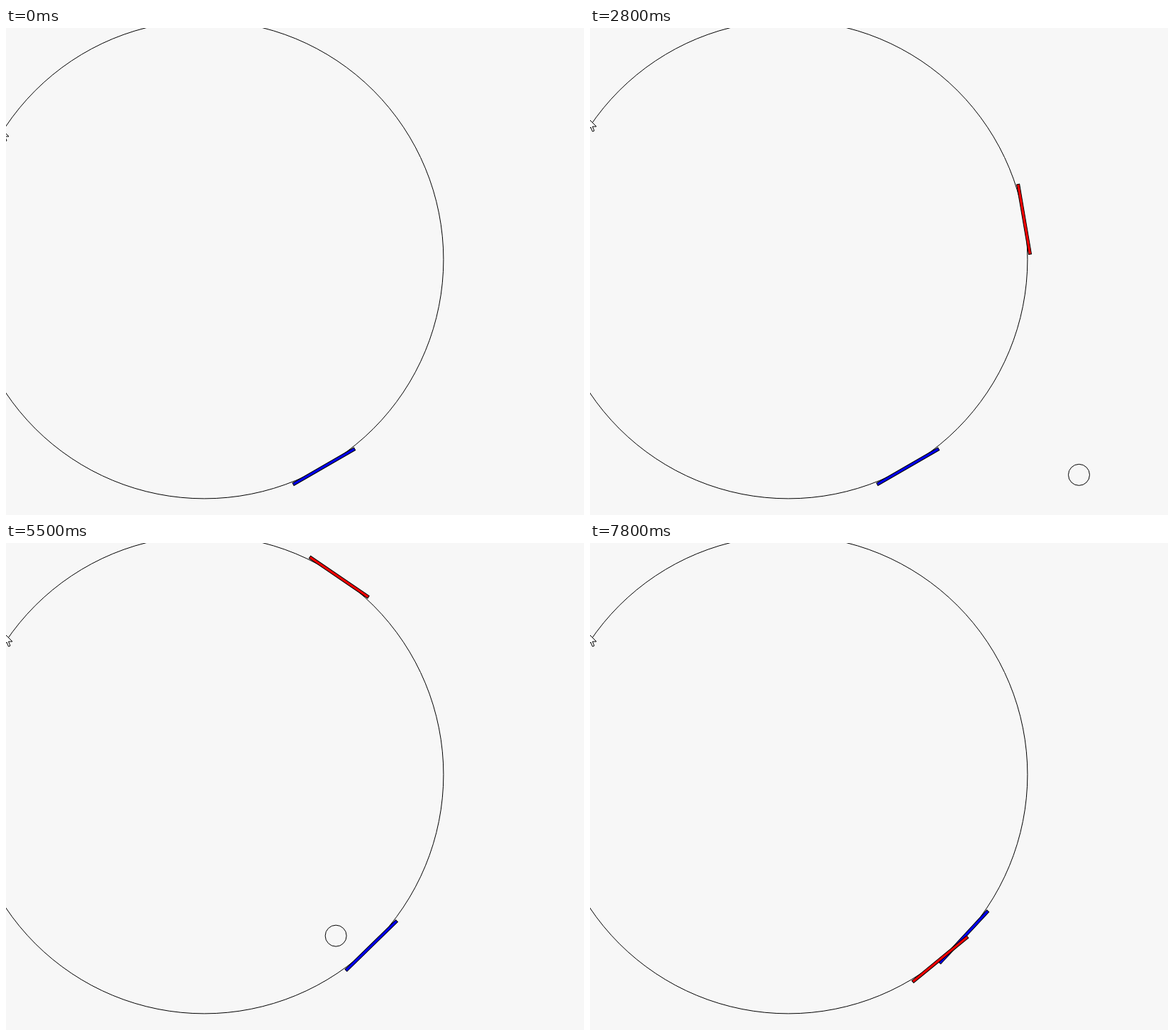
Write an HTML page with a canvas that moves like this. It is 815 px wide and 687 px high and loops after 8000 ms.

```html
<!DOCTYPE html>
<html lang="en">
<head>
<meta charset="utf-8">
<title>Circular paddle game</title>
<style>
  html, body { margin: 0; width: 100%; height: 100%; overflow: hidden; background: #f7f7f7; }
  canvas { display: block; }
</style>
</head>
<body>
<canvas id="stage" width="815" height="687"></canvas>
<script>
const ctx = document.getElementById('stage').getContext('2d');
const LOOP = 8000, STEP = 100;
const RING = { x: 279.7, y: 326.7, r: 337.2 };
const RED = '#f00', BLUE = '#00f';
const TURN = 0.155;                       // paddle speed, degrees per ms
const BALL = { x: 253, y: 342, r: 15, contact: 334, life: 870 };
const SPARKS = { count: 30, reach: 74, life: 775 };

// Each move is [time, angle to head for]; paddles turn at a constant speed.
const red = {
  color: RED, start: -165,
  moves: [
    [90, -118], [500, -109.5], [700, 39], [1850, 45], [2447, -41], [3640, -81],
    [4150, -61.5], [4450, -52.6], [4650, -55.7], [5700, -81], [6893, 50.6]
  ]
};
const blue = {
  color: BLUE, start: 60,
  moves: [[2800, 24], [3032, 97], [3588, 40], [5100, 45.7], [5650, 42.9], [6590, 11.3], [7150, 42.8]]
};

// A ball is served along `aim` and leaves the ring edge along `out`.
const serves = [
  { at: 829, aim: 45, out: 14.6 },
  { at: 2259, aim: 45, out: 14.6 },
  { at: 3767, aim: 45, out: 45 },
  { at: 5200, aim: 45, out: 222.6, hitColor: RED, bursts: true },
  { at: 6690, aim: 37.3, out: 37.3, color: RED, hitColor: RED }
];

const radians = degrees => degrees * Math.PI / 180;

function randomFrom(seed) {
  return () => (seed = seed * 16807 % 2147483647) / 2147483647;
}

function disc(x, y, r, fill, outlined) {
  ctx.beginPath();
  ctx.arc(x, y, r, 0, Math.PI * 2);
  if (fill) { ctx.fillStyle = fill; ctx.fill(); }
  if (outlined) ctx.stroke();
}

function paddleAngle({ start, moves }, t) {
  return moves.reduce((angle, [time, goal]) => {
    const reach = Math.max(0, t - time) * TURN;
    const gap = goal - angle;
    return angle + Math.sign(gap) * Math.min(Math.abs(gap), reach);
  }, start);
}

function drawPaddle(paddle, t) {
  ctx.save();
  ctx.translate(RING.x, RING.y);
  ctx.rotate(radians(paddleAngle(paddle, t)));
  ctx.fillStyle = paddle.color;
  ctx.fillRect(RING.r - 2, -50, 4, 100);
  ctx.strokeRect(RING.r - 2, -50, 4, 100);
  ctx.restore();
}

function ballPosition({ aim, out }, age) {
  const before = Math.min(age, BALL.contact), after = age - before;
  return [
    BALL.x + before * Math.cos(radians(aim)) + after * Math.cos(radians(out)),
    BALL.y + before * Math.sin(radians(aim)) + after * Math.sin(radians(out))
  ];
}

function drawBurst(x, y, age) {
  if (age >= SPARKS.life) return;
  const random = randomFrom(41);
  const spread = SPARKS.reach * age / SPARKS.life * 2.12;
  ctx.globalAlpha = 1 - age / SPARKS.life;
  for (let i = 0; i < SPARKS.count; i++) {
    const dx = random() - 0.5, dy = random() - 0.5;
    disc(x + dx * spread, y + dy * spread, 4, RED);
  }
  ctx.globalAlpha = 1;
}

function drawBall(serve, t) {
  const age = t - serve.at;
  if (age < 0) return;
  if (age < BALL.life) {
    const color = age < BALL.contact ? serve.color : serve.hitColor;
    disc(...ballPosition(serve, age), BALL.r, color, true);
  } else if (serve.bursts) {
    drawBurst(...ballPosition(serve, BALL.life), age - BALL.life);
  }
}

const arrow = new Path2D('M0 0V17L4 13L6.5 19L9 18L6.5 12H12Z');

function drawCursor(t) {
  const k = Math.min(1, t / 300);
  ctx.save();
  ctx.translate(-8 + 5 * k, 141 - 14 * k);
  ctx.fillStyle = '#fff';
  ctx.fill(arrow);
  ctx.stroke(arrow);
  ctx.restore();
}

function draw(t) {
  ctx.fillStyle = '#f7f7f7';
  ctx.fillRect(0, 0, 815, 687);
  ctx.strokeStyle = '#000';
  ctx.lineWidth = 1;
  disc(RING.x, RING.y, RING.r, null, true);
  serves.forEach(serve => drawBall(serve, t));
  drawPaddle(blue, t);
  drawPaddle(red, t);
  drawCursor(t);
}

const begin = performance.now();
function tick() {
  const t = (performance.now() - begin) % LOOP;
  draw(Math.floor(t / STEP) * STEP);
  requestAnimationFrame(tick);
}
tick();
</script>
</body>
</html>
```
